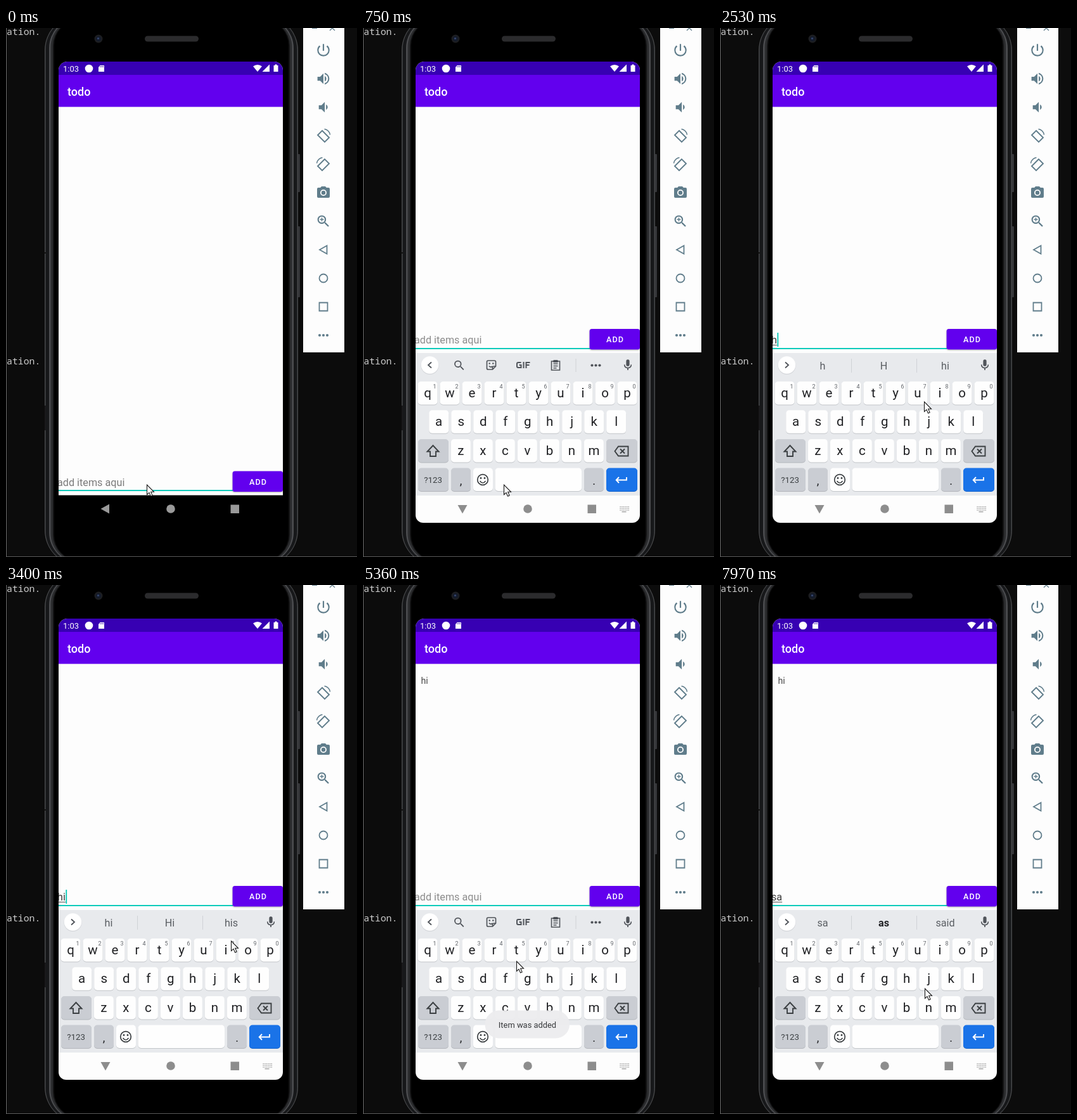
Write an HTML page with a canvas that moves like this. It is 554 px wide and 835 px high and loops after 8000 ms.

```html
<!DOCTYPE html>
<html lang="en">
<head>
<meta charset="utf-8">
<title>Todo app</title>
<style>
html, body { margin: 0; width: 100%; height: 100%; overflow: hidden; background: #0c0c0c; }
canvas { display: block; }
</style>
</head>
<body>
<canvas id="stage" width="554" height="835"></canvas>
<script>
const ctx = document.getElementById('stage').getContext('2d');
const LOOP = 8000;
const SANS = 'Roboto, sans-serif';
const KEY_INK = '#202124', ICON_INK = '#50545a', SIDE_INK = '#607d8b';

// Bursts of screen updates: start, end, number of steps
const BURSTS = [[0, 0, 1], [150, 750, 5], [1270, 2230, 8], [2380, 2530, 2], [2830, 3130, 3],
  [3400, 4370, 8], [4490, 5500, 8], [5630, 6620, 8], [6740, 7700, 8], [7850, 7970, 2]];

// Pointer path: time, x, y
const PATH = [[1150, 222, 721], [1544, 260, 668], [1818, 294, 624], [2400, 294, 624],
  [2530, 322, 590], [2830, 346, 571], [3130, 350, 567], [3400, 355, 562], [3816, 396, 490],
  [4490, 396, 491], [4900, 330, 536], [5356, 242, 594], [5500, 238, 594], [5920, 300, 570],
  [6050, 335, 566], [6300, 280, 590], [6600, 157, 617], [6890, 157, 617], [7150, 120, 622],
  [7300, 118, 624], [7562, 190, 674], [7700, 255, 672], [7850, 308, 648], [7970, 323, 637]];

// Typed text: time, text, three suggestions, index of the bold one
const TYPING = [[0, ''], [2380, 'h', ['h', 'H', 'hi']], [3120, 'hi', ['hi', 'Hi', 'his']],
  [4225, '', ['hi', 'Hi', 'his']], [4490, ''], [7000, 's', ['s', 'so', 'see']],
  [7420, 'sa', ['sa', 'as', 'said'], 1]];

// Key previews: from, until, letter, key centre x, key bottom
const PREVIEWS = [[1950, 2380, 'h', 295, 641], [2970, 3120, 'i', 348, 596],
  [6740, 7000, 's', 155, 641], [7280, 7420, 'a', 120, 641]];

// Phone rim, from the outside in: inset and colour
const RIM = [[0, '#47484a'], [1.5, '#17181a'], [7, '#4c4d50'], [9.5, '#2b2c2e'], [13, '#121213'], [15, '#000']];

const ICONS = {
  power: 'M13 3h-2v10h2V3zm4.83 2.17l-1.42 1.42A6.92 6.92 0 0 1 19 12a7 7 0 1 1-11.42-5.42L6.17 5.17A8.98 8.98 0 0 0 3 12a9 9 0 0 0 18 0c0-2.74-1.23-5.18-3.17-6.83z',
  loud: 'M3 9v6h4l5 5V4L7 9H3zm13.5 3A4.5 4.5 0 0 0 14 7.97v8.05A4.47 4.47 0 0 0 16.5 12zM14 3.23v2.06a7 7 0 0 1 0 13.42v2.06a9 9 0 0 0 0-17.54z',
  quiet: 'M18.5 12A4.5 4.5 0 0 0 16 7.97v8.05A4.5 4.5 0 0 0 18.5 12zM5 9v6h4l5 5V4L9 9H5z',
  camera: 'M9 2L7.17 4H4a2 2 0 0 0-2 2v12a2 2 0 0 0 2 2h16a2 2 0 0 0 2-2V6a2 2 0 0 0-2-2h-3.17L15 2H9zm3 15a5 5 0 1 1 0-10 5 5 0 0 1 0 10zm0-1.8a3.2 3.2 0 1 0 0-6.4 3.2 3.2 0 0 0 0 6.4z',
  search: 'M15.5 14h-.79l-.28-.27A6.47 6.47 0 0 0 16 9.5 6.5 6.5 0 1 0 9.5 16c1.61 0 3.09-.59 4.23-1.57l.27.28v.79l5 4.99L20.49 19l-4.99-5zm-6 0a4.5 4.5 0 1 1 0-9 4.5 4.5 0 0 1 0 9z',
  mic: 'M12 14a3 3 0 0 0 3-3V5a3 3 0 0 0-6 0v6a3 3 0 0 0 3 3zm5.3-3a5.3 5.3 0 0 1-10.6 0H5a7 7 0 0 0 6 6.92V21h2v-3.08A7 7 0 0 0 19 11h-1.7z'
};

const clamp = v => Math.max(0, Math.min(1, v));
const smooth = v => { v = clamp(v); return v * v * (3 - 2 * v); };

function rect(x, y, w, h, color) {
  ctx.fillStyle = color;
  ctx.fillRect(x, y, w, h);
}

function round(x, y, w, h, r, color) {
  ctx.beginPath();
  ctx.roundRect(x, y, w, h, r);
  ctx.fillStyle = color;
  ctx.fill();
}

function disc(x, y, r, color) {
  ctx.beginPath();
  ctx.arc(x, y, r, 0, 7);
  ctx.fillStyle = color;
  ctx.fill();
}

function text(str, x, y, size, color, align = 'left', weight = 400, family = SANS) {
  ctx.font = `${weight} ${size}px ${family}`;
  ctx.textAlign = align;
  ctx.fillStyle = color;
  ctx.fillText(str, x, y);
}

function icon(name, x, y, size, color) {
  ctx.save();
  ctx.translate(x - size / 2, y - size / 2);
  ctx.scale(size / 24, size / 24);
  ctx.fillStyle = color;
  ctx.fill(new Path2D(ICONS[name]), 'evenodd');
  ctx.restore();
}

// Strokes or fills a path given relative to (x, y)
function line(d, x, y, color, width = 2, fill) {
  ctx.save();
  ctx.translate(x, y);
  const p = new Path2D(d);
  if (fill) { ctx.fillStyle = fill; ctx.fill(p); }
  if (width) { ctx.strokeStyle = color; ctx.lineWidth = width; ctx.stroke(p); }
  ctx.restore();
}

const circlePath = r => `M${-r} 0a${r} ${r} 0 1 0 ${2 * r} 0a${r} ${r} 0 1 0 ${-2 * r} 0z`;

function dots(x, y, gap, r, color) {
  for (let i = -1; i < 2; i++) disc(x + i * gap, y, r, color);
}

function drawPhone() {
  rect(0, 0, 554, 835, '#0c0c0c');
  for (const y of [11, 531]) text('ation.', 1, y, 14.8, '#cccccc', 'left', 400, '"Noto Sans Mono", monospace');

  round(460, 199, 4, 60, 1, '#343538');
  round(460, 313, 4, 112, 1, '#343538');
  for (const [d, color] of RIM) round(61 + d, -20 + d / 2, 400 - 2 * d, 868 - d, 55 - d, color);
  rect(61, 354, 2, 2, '#111');
  rect(61, 596, 2, 39, '#19191b');

  round(219, 12.5, 85, 9, 4.5, '#2b2b2d');
  disc(146, 17, 6.5, '#1d1e21');
  disc(146, 17, 4, '#141b2b');
  disc(145.5, 16.5, 1.6, '#35466e');
  rect(0, 0, 1, 835, '#6a6a6a');
  rect(0, 834, 554, 1, '#5a5a5a');
}

function drawSidebar() {
  rect(469, 0, 65, 512, '#fdfdfd');
  rect(483, 0, 8, 1, SIDE_INK);
  line('M-4-4L4 4M4-4L-4 4', 515, 0, SIDE_INK, 1.3);
  icon('power', 501, 35, 26, SIDE_INK);
  icon('loud', 501, 80, 25, SIDE_INK);
  icon('quiet', 501, 125, 25, SIDE_INK);
  for (const [y, side] of [[170, 1], [215, -1]]) {
    ctx.save();
    ctx.translate(501, y);
    ctx.scale(side, 1);
    line('M-2-9L9 2 2 9-9-2z', 0, 1, SIDE_INK, 1.9);
    line('M1.5-10.5A10.5 10.5 0 0 1 10.5-1.5', 0, 0, SIDE_INK, 1.7);
    ctx.restore();
  }
  icon('camera', 501, 260, 24, SIDE_INK);
  icon('search', 501, 305, 25, SIDE_INK);
  line('M-3 0H3M0-3V3', 498.5, 302.2, SIDE_INK, 1.4);
  line('M-6 0L5.5-6.5V6.5z', 501, 350, SIDE_INK, 1.8);
  line(circlePath(6.5), 501, 395, SIDE_INK, 1.8);
  line('M-6.5-6.5H6.5V6.5H-6.5z', 501, 440, SIDE_INK, 1.8);
  dots(501, 485, 6, 2.1, SIDE_INK);
}

function drawApp(t, field) {
  const open = t >= 150;
  rect(83, 53, 354, 684.5, '#fdfdfd');
  rect(83, 53, 354, 21, '#3700b3');
  rect(83, 74, 354, 50.5, '#6200ee');
  text('1:03', 90, 68.5, 13, '#fff');
  disc(131, 64, 6.3, '#fff');
  line('M-4.5 2V-2L-2-5H4.5V5H-4.5z', 150.5, 64, '#fff', 0, '#fff');
  line('M-1.5-4V-2M.7-4V-2M2.8-4V-2', 150.5, 64, '#3700b3', .9);
  line('M0 5.5L-7-3A11 11 0 0 1 7-3z', 397, 63.5, '#fff', 0, '#fff');
  line('M5.5-6V5.5H-6z', 410.5, 63.5, '#fff', 0, '#fff');
  line('M-3.5-4.5H-1.5V-6H1.5V-4.5H3.5V5.5H-3.5z', 426, 63.5, '#fff', 0, '#fff');
  text('todo', 97, 107, 18, '#fff', 'left', 500);
  if (t >= 4225) text('hi', 91.5, 155.5, 14.2, '#4a4a4a');

  const dy = open ? 0 : 224.5;
  rect(83, Math.floor(505 + dy), 275, 2, '#0fcbbb');
  if (field.text) {
    text(field.text, 81, 498 + dy, 16.2, '#3a3a3a');
    const w = ctx.measureText(field.text).width;
    rect(83, 500, w - 2, 1, '#555');
    if ((t - field.at) % 1000 < 500) rect(81.5 + w, 481, 1.8, 22, '#03c8b5');
  } else {
    text('add items aqui', 81, 498 + dy, 16.2, open ? '#8c8c8c' : '#7a7a7a');
  }

  ctx.save();
  ctx.shadowColor = 'rgba(0,0,0,.3)';
  ctx.shadowBlur = 2.5;
  ctx.shadowOffsetY = 1.2;
  round(357.6, 475 + dy, 79.4, 32.4, 3.5, '#6200ee');
  ctx.restore();
  const press = smooth((t - 3940) / 200) * (1 - smooth((t - 4350) / 350));
  if (press > 0) round(357.6, 475, 79.4, 32.4, 3.5, `rgba(255,255,255,${.22 * press})`);
  ctx.letterSpacing = '1.1px';
  text('ADD', 398, 496 + dy, 12.6, '#fff', 'center', 500);
  ctx.letterSpacing = '0px';
}

function key(x, y, w, color = '#fefefe', shade = '#c3c6ca') {
  round(x, y + 1, w, 36.5, 5, shade);
  round(x, y, w, 36.5, 5, color);
}

function drawTools(field) {
  disc(105.5, 533, 14, '#d4d6da');
  disc(105.5, 532, 13.7, '#fff');
  icon('mic', 418, 532, 21, ICON_INK);
  const words = field.words;
  if (words) {
    line('M-2.5-4.5L2.5 0-2.5 4.5', 105.5, 532, ICON_INK, 1.8);
    words.forEach((word, i) => {
      const bold = field.bold === i;
      text(word, [162, 258.5, 355.5][i], 538.5, 16.2, bold ? KEY_INK : '#5a5e63', 'center', bold ? 700 : 400);
    });
    for (const x of [207, 310]) rect(x, 522, 1, 22, '#cfd2d6');
    return;
  }
  line('M2.5-4.5L-2.5 0 2.5 4.5', 105.5, 532, ICON_INK, 1.8);
  icon('search', 152, 532.5, 21, ICON_INK);
  line('M-5-7H5Q7-7 7-5V2L2 7H-5Q-7 7-7 5V-5Q-7-7-5-7zM7 2H4Q2 2 2 4V7M-3.5 1.5Q-1 4.5 2 2', 202.5, 532, ICON_INK, 1.7);
  disc(199.7, 529.5, 1.2, ICON_INK);
  disc(205.3, 529.5, 1.2, ICON_INK);
  line('M-3-4H-7.5Q-9.5-4-9.5-2V2Q-9.5 4-7.5 4H-3V0H-6M1-5V5M5 5V-4H11M5 0H10', 252.5, 532, ICON_INK, 2);
  line('M-6.5-6H6.5V8H-6.5zM-3.5-2H3.5M-3.5 1.5H3.5M-3.5 4.7H1.5', 304, 532, ICON_INK, 1.6);
  round(300, 524, 8, 4, 1.5, ICON_INK);
  rect(335.5, 522, 1, 21, '#cfd2d6');
  dots(367.5, 532.5, 6, 2.1, ICON_INK);
}

function drawKeyboard(field) {
  rect(83, 513, 354, 225, '#e8eaed');
  rect(83, 738, 354, 60, '#fdfdfd');
  drawTools(field);
  const rows = [['qwertyuiop', 102, 558], ['asdfghjkl', 119.7, 603.3], ['zxcvbnm', 154.4, 649]];
  rows.forEach(([letters, x0, y], row) => [...letters].forEach((c, i) => {
    const x = x0 + i * 35;
    key(x - 15.5, y, 31);
    text(c, x, y + 24.7, 20.5, KEY_INK, 'center');
    if (!row) text((i + 1) % 10, x + 11, y + 10.5, 9, '#5f6368', 'center');
  }));
  const gray = '#cacdd3', shade = '#b4b7bc';
  key(87, 649, 48, gray, shade);
  key(384, 649, 49, gray, shade);
  key(87, 694.5, 48, gray, shade);
  key(139, 694.5, 31, gray, shade);
  key(174, 694.5, 31);
  key(208.5, 694.5, 136.5);
  key(349, 694.5, 31, gray, shade);
  key(384, 694.5, 49, '#1a73e8', '#1765cc');
  line('M0-9L9 .5H4.5V8H-4.5V.5H-9z', 110.5, 668, '#3c4043', 1.9);
  line('M-10.5 0L-5-7.5H10.5V7.5H-5zM-2-3.5L5 3.5M5-3.5L-2 3.5', 408, 668, '#3c4043', 1.9);
  text('?123', 110.5, 718, 13.3, '#3c4043', 'center');
  text(',', 154.5, 721, 18, KEY_INK, 'center');
  text('.', 364.5, 721, 18, KEY_INK, 'center');
  line(circlePath(8.3), 189, 713, '#3c4043', 1.7);
  disc(186, 710.5, 1.4, '#3c4043');
  disc(192, 710.5, 1.4, '#3c4043');
  line('M-4.5 2Q0 8 4.5 2', 189, 713, '#3c4043', 1.6);
  line('M8-4.5V0H-8M-4-4.5L-8.3 0-4 4.5', 408, 713.5, '#fff', 1.9);
}

function drawNav(t) {
  const ink = t < 150 ? '#9a9a9a' : '#8d8d8d';
  ctx.save();
  ctx.translate(157, 759);
  ctx.rotate(-Math.PI / 2 * smooth((t - 350) / 400));
  line('M-7.5 0L6-7.5V7.5z', 0, 0, ink, 0, ink);
  ctx.restore();
  disc(260, 759, 6.8, ink);
  rect(354.5, 752.5, 13.5, 13.5, ink);
  if (t < 300) return;
  for (let r = 0; r < 3; r++) for (let c = 0; c < 6; c++) rect(405.5 + c * 2.6, 755 + r * 2.7, 1.4, 1.4, '#9a9a9a');
  rect(408.5, 763, 7, 1.3, '#9a9a9a');
}

function drawPreview(t) {
  const hit = PREVIEWS.find(([from, until]) => t >= from && t < until);
  if (!hit) return;
  const [, , letter, x, bottom] = hit;
  ctx.save();
  ctx.shadowColor = 'rgba(0,0,0,.3)';
  ctx.shadowBlur = 4;
  ctx.shadowOffsetY = 1;
  round(x - 17.5, bottom - 102, 35, 101, 5, '#c8cbd1');
  ctx.restore();
  text(letter, x, bottom - 67, 22.5, KEY_INK, 'center');
  dots(x + 8.5, bottom - 57, 3, .8, KEY_INK);
}

function drawToast(t) {
  const alpha = smooth((t - 4250) / 220) * (1 - smooth((t - 6200) / 350));
  if (!alpha) return;
  ctx.save();
  ctx.globalAlpha = alpha;
  round(192.5, 671.5, 133.5, 44, 22, 'rgba(236,237,239,.95)');
  text('Item was added', 259.5, 699, 12.9, '#37393c', 'center');
  ctx.restore();
}

function drawPointer(t) {
  const next = PATH.findIndex(p => p[0] > t);
  const b = PATH[next < 0 ? PATH.length - 1 : next];
  const a = next > 0 ? PATH[next - 1] : b;
  const p = a === b ? 0 : (t - a[0]) / (b[0] - a[0]);
  const x = Math.round(a[1] + (b[1] - a[1]) * p);
  const y = Math.round(a[2] + (b[2] - a[2]) * p);
  line('M0 0V15.5L3.5 12.3 6 18 8.6 16.9 6.2 11.3H11z', x + .5, y, '#1a1a1a', 1.1, '#fff');
}

function snap(t) {
  const [start, end, steps] = BURSTS.filter(b => b[0] <= t).pop();
  if (steps < 2) return start;
  const gap = (end - start) / (steps - 1);
  return start + gap * Math.min(steps - 1, Math.floor((t - start) / gap + 1e-6));
}

function draw(now) {
  const t = snap(now % LOOP);
  const [at, str, words, bold] = TYPING.filter(e => e[0] <= t).pop();
  const field = { at, text: str, words, bold };

  drawPhone();
  drawSidebar();
  ctx.save();
  ctx.beginPath();
  ctx.roundRect(83, 53, 354, 728, [14, 14, 12, 12]);
  ctx.clip();
  drawApp(t, field);
  if (t >= 150) {
    ctx.save();
    ctx.translate(0, Math.round(160 * Math.pow(clamp((750 - t) / 600), 4)));
    drawKeyboard(field);
    ctx.restore();
  }
  drawNav(t);
  drawPreview(t);
  drawToast(t);
  ctx.restore();
  drawPointer(t);
}

const origin = performance.now();
function tick() {
  draw(performance.now() - origin);
  requestAnimationFrame(tick);
}
tick();
</script>
</body>
</html>
```
